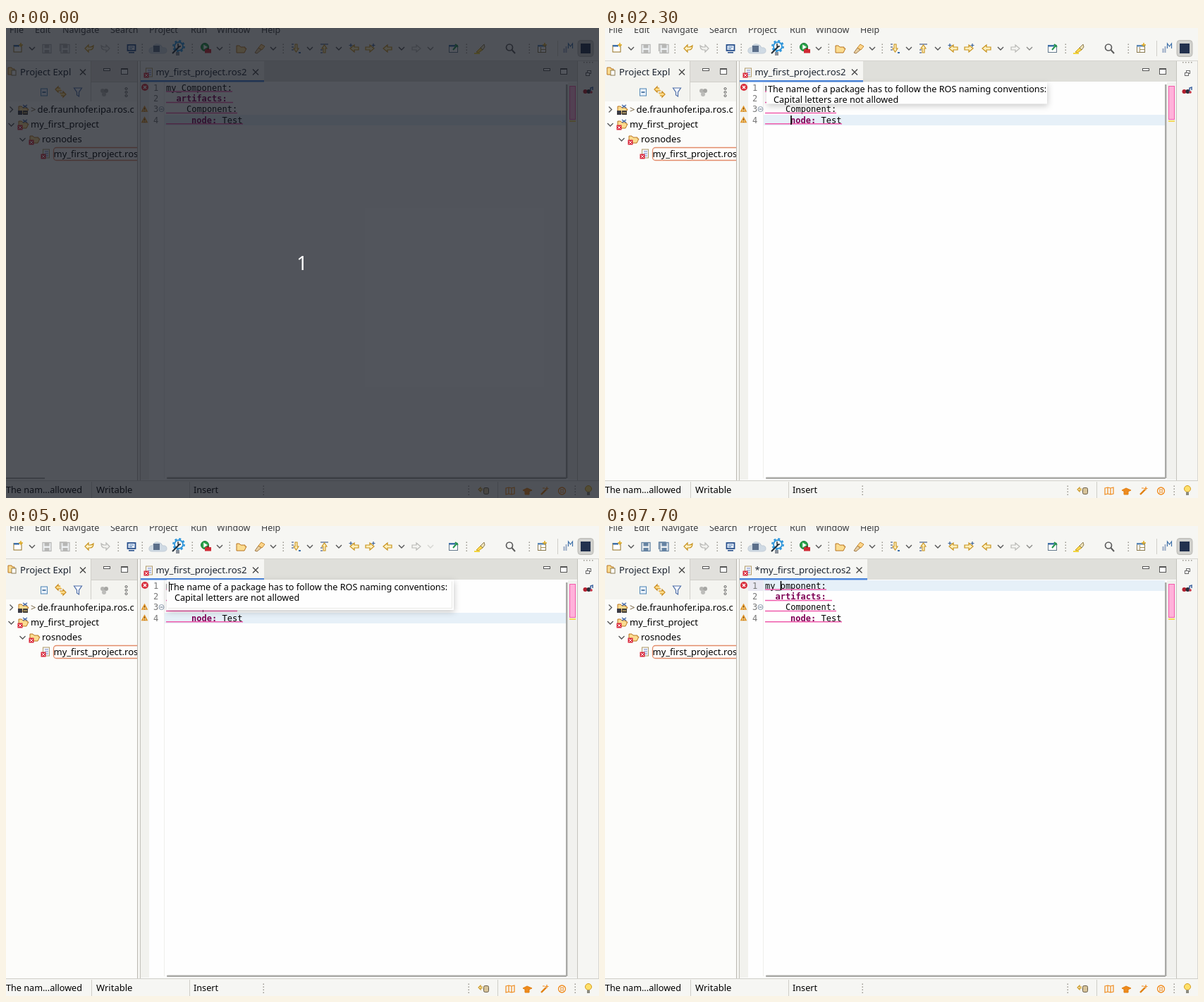
Recreate the animation shown at these times as an HTML page. Size 841 by 666 pixels, loop 8 s.

```html
<!DOCTYPE html>
<html lang="en">
<head>
<meta charset="utf-8">
<title>Editor validation</title>
<style>
html, body { margin: 0; width: 100%; height: 100%; overflow: hidden; background: #fefefe; }
svg { display: block; }
text { font: 13px "Noto Sans", "Open Sans", sans-serif; white-space: pre; }
.code { font: 12px "DejaVu Sans Mono", monospace; }
.key { font-weight: bold; fill: #7f0055; }
.menu { font-size: 12.5px; fill: #3c3c3c; }
.title { font-size: 13.2px; fill: #1c2430; }
.tip, .small { font-size: 12.65px; }
.shadow { filter: drop-shadow(1px 3px 4px #0003); }
.count { font-size: 27px; fill: #fff; text-anchor: middle; }
</style>
</head>
<body>
<svg id="stage" width="841" height="666" viewBox="0 0 841 666"></svg>
<script>
const rect = (x, y, w, h, fill, more = '') =>
  `<rect x="${x}" y="${y}" width="${w}" height="${h}" fill="${fill}" ${more}/>`;
const line = (d, color, width = 1, fill = 'none') =>
  `<path d="${d}" stroke="${color}" stroke-width="${width}" fill="${fill}"/>`;
const dot = (x, y, r, fill, more = '') => `<circle cx="${x}" cy="${y}" r="${r}" fill="${fill}" ${more}/>`;
const text = (x, y, s, cls = '', more = '') => `<text x="${x}" y="${y}" class="${cls}" ${more}>${s}</text>`;
const group = (id, ...parts) => `<g id="${id}">${parts.join('')}</g>`;

const GOLD = '#c8931e', GREY = '#b9b9b6', DARK = '#555', BLUE = '#3d6fa8', ORANGE = '#f08a1c', EDGE = '#c4c3bd';
const chevron = (x, color = DARK, id = '') =>
  `<path id="${id}" d="M${x - 4} 27l4 4 4-4" stroke="${color}" stroke-width="1.4" fill="none"/>`;
const handle = (x, y) => [0, 4, 8, 12].map(i => rect(x - .5, y - 6.5 + i, 1.5, 1.5, '#99968e')).join('');
const close = (x, y) => line(`M${x - 4} ${y - 4}l8 8m0-8l-8 8`, '#444', 1.3);
const minMax = (x, gap) => rect(x - 4.5, 57.5, 9, 3, '#fff', 'stroke="#555"') +
  rect(x + gap - 4.5, 57.5, 9, 8, '#fff', 'stroke="#555"') + rect(x + gap - 4, 57, 9, 2, DARK);
const errorBadge = (x, y) => rect(x - 3.5, y - 3.5, 7, 7, '#d9283c') +
  line(`M${x - 2} ${y - 2}l4 4m0-4l-4 4`, '#fff');
const folder = (x, y) => line(`M${x - 6} ${y + 5}v-10h4l2 2h6v2h2l-3 6z`, '#b87420', 1, '#fbdc90');
const fileIcon = (x, y) => rect(x - 3.5, y - 6, 9, 12, '#f4f6fc', 'stroke="#b09a66"') +
  [-3, 0, 3].map(i => line(`M${x - 1} ${y + i}h5`, '#6f86c8')).join('') + errorBadge(x - 3, y + 4);
const warning = y => line(`M196.5 ${y - 3.5}l3.5 6.5h-7z`, '#e0962c', 1.6, '#ffdf9c') +
  rect(196, y - 2, 1, 3, '#7a4a10') + rect(196, y + 2, 1, 1, '#7a4a10');
const arrow = (x, dir, color, fill) =>
  `<g transform="translate(${x} 29) scale(${dir} 1)">${line('M6-2H0v-3l-6 5 6 5V2h6z', color, 1.2, fill)}</g>`;
const floppy = (x, color) => rect(x - 6, 23.5, 12, 12, '#eef1f3', `stroke="${color}" stroke-width="1.3"`) +
  rect(x - 3.5, 24, 7, 4.5, color) + rect(x - 3.5, 31, 7, 4.5, color);
const saves = color => floppy(58, color) + line('M76.5 33v-10h10', color, 1.3) + floppy(84, color);

const frame = [
  rect(0, 0, 841, 666, '#f6f6f3'),
  rect(0, 46, 841, 1, '#d5d4cf'),
  rect(0, 47, 186, 594, '#fcfcfa'),
  rect(0, 47, 121, 57, '#f4f4f0'), rect(121, 47, 65, 29, '#e1e0dc'), rect(121, 76, 65, 28, '#f4f4f0'),
  rect(120, 47, 1, 57, '#d0cfca'), rect(121, 76, 65, 1, '#d0cfca'),
  rect(186, 47, 1, 594, '#b9b7b0'),
  rect(190, 47, 620, 594, '#fefefe'), rect(190, 47, 620, 29, '#dfdfda'),
  rect(190, 47, 1, 594, '#c4c2bb'), rect(810, 47, 1, 594, EDGE), rect(840, 47, 1, 594, '#d8d7d2'),
  rect(191, 76, 12, 564, '#f2f2ee'), rect(224, 77, 1, 561, '#efefec'),
  rect(797, 77, 13, 563, '#f1f1ee'),
  rect(0, 641, 841, 1, '#cfcec8'),
  [121, 260, 697].map(x => rect(x, 643, 1, 23, '#cfcec8')).join(''),
  [365, 656, 807].map(x => handle(x, 655)).join('')
].join('');

const menus = [[5, 'File'], [41, 'Edit'], [80, 'Navigate'], [148, 'Search'], [203, 'Project'],
  [262, 'Run'], [299, 'Window'], [362, 'Help']].map(([x, s]) => text(x, 6.5, s, 'menu')).join('');

const gear = dot(245, 26, 6, '#f6f6f3', 'stroke="#2a93da" stroke-width="1.8"') +
  dot(245, 26, 7.8, 'none', 'stroke="#2a93da" stroke-width="2.2" stroke-dasharray="3 3.13"') +
  line('M236 36l10-10', '#26323c', 2.2) + line('M244 22v4h4', '#26323c', 1.5);

const toolbar = [
  [99, 159, 193, 264, 317, 393, 653, 742].map(x => handle(x, 29)).join(''),
  [37, 303, 379, 431, 472, 561].map(x => chevron(x)).join(''), chevron(602, '#8c8c89', 'lastChevron'),
  rect(11, 24.5, 11, 9.5, '#fff', 'stroke="#94701f"'), rect(11, 24, 8, 2.5, BLUE),
  line('M21 21v6m-3-3h6', '#e0a91e', 1.5),
  group('savesOff', saves('#b7b7b5')), group('savesOn', saves('#6684a3')),
  line('M117 24l-5 5 5 5v-3h2q5 0 5-6q-2 2-5 2h-2z', GOLD, 1.2, '#fff3c8'),
  line('M142 24l5 5-5 5v-3h-2q-5 0-5-6q2 2 5 2h2z', GREY, 1.2, '#f2f2ef'),
  rect(172.5, 24, 11, 8, '#e8f0fb', 'stroke="#28508c" stroke-width="1.8"'),
  line('M175 27h6m-6 2.5h4', BLUE), rect(174, 34, 8, 1.6, '#28508c'),
  line('M207 36q-5 0-4-5 1-4 5-3 1-6 8-5 5 1 6 5 6-1 6 4 0 4-5 4z', '#c2ccd6', 1, '#cfdae4'),
  rect(209, 25, 9, 9, '#5b6f8a'),
  gear, rect(241, 34, 5, 5, '#8a909a'),
  dot(282, 27, 5.5, '#29a349', 'stroke="#177634"'), line('M280.5 24l5 3-5 3z', '#fff', .5, '#fff'),
  rect(282, 30, 9, 5.5, '#d02a34'), rect(285, 28.5, 3, 2, '#8a1820'),
  folder(333, 30),
  line('M353 35l5-7 4 3-6 5z', '#a07848', 1, '#e8cfa0'), line('M358 28l4-5 5 3-4 5z', '#c58a32', 1, '#ffd588'),
  line('M405 23h3m-3 4h3m-3 4h3', '#6b7ca0', 1.5), line('M410 23v6h-2l3.5 5 3.5-5h-2v-6z', GOLD, 1.1, '#fff0bd'),
  line('M415 35h3', BLUE, 2),
  line('M446 35h3m-3-4h3m-3-8h11', '#6b7ca0', 1.5),
  line('M450 35v-6h-2l3.5-5 3.5 5h-2v6z', GOLD, 1.1, '#fff0bd'),
  arrow(494, 1, GOLD, '#fff0bd'), line('M489 22v5m-2.5-2.5h5', '#3b6298', 1.2),
  arrow(516, -1, GOLD, '#fff0bd'), line('M521 22v5m-2.5-2.5h5', '#3b6298', 1.2),
  arrow(541, 1, GOLD, '#fff0bd'), arrow(582, -1, GREY, '#f4f4f1'),
  rect(628.5, 24.5, 12, 10, '#fff', 'stroke="#64798c"'), rect(628, 24, 9, 2.5, BLUE),
  line('M634 31l6-7m-3-1l4 4', '#269450', 2),
  line('M667 34l6-6 3 3-6 4z', '#c79a20', 1, '#ffd94e'), line('M673 28l5-5 1 4-3 4z', '#8a7a50', 1, '#eee2b8'),
  line('M664 36h8', '#f2d63e', 2),
  dot(714, 27.5, 4.5, 'none', 'stroke="#5c5c5c" stroke-width="1.7"'), line('M717.5 31l4.5 5', '#5c5c5c', 2),
  rect(754.5, 24.5, 11, 10, '#fff', 'stroke="#8a7a50"'), rect(754, 24, 12, 2.5, '#5b88b8'),
  line('M758.5 27v7m0-3.5h7', '#a49058'), line('M764 21v6m-3-3h6', '#e0a91e', 1.5),
  rect(782, 18, 1, 22, '#d0cfca'),
  line('M791.5 35v-6m3 6v-9', '#9aabc6', 2), line('M797.5 29v-7l3 4 3-4v7', BLUE, 1.2),
  rect(811, 17.5, 22, 23, '#d0d0cd', 'rx="4" stroke="#bbbab5"'), rect(815, 22, 14, 14, '#22314e')
].join('');

const explorer = [
  line('M3 56h5l1 2h3v8h-9z', '#b87420', 1, '#fbdc90'), rect(8, 60, 6, 7, '#fff', 'stroke="#8a7a50"'),
  text(20, 67, 'Project Expl', 'title'), close(109, 62.5), minMax(143, 25),
  rect(49.5, 86, 9, 10, '#eaf2fb', 'stroke="#4f85b5"'), line('M51.5 91h5', '#24578c', 1.5),
  line('M77 85h-3v-2l-4 4 4 4v-2h5m-1 7h3v2l4-4-4-4v2h-5', '#c98a1c', 1.2, '#ffdd8a'),
  line('M96.5 85h11l-4 6v6l-3-2v-4z', '#4f6fa8', 1.2, '#f4f7fc'),
  dot(137, 89, 3, '#b5b5b2'), dot(142, 89, 3, '#a6a6a3'), dot(139, 94, 3, '#bcbcb9'),
  [86, 91, 96].map(y => dot(170.5, y, 1.5, 'none', 'stroke="#555"')).join(''),
  '<clipPath id="panel"><rect y="47" width="186" height="594"/></clipPath><g clip-path="url(#panel)">',
  line('M5.5 111.5l4 4-4 4M3.5 135l4 4 4-4M19.5 156l4 4 4-4', DARK, 1.3),
  folder(24, 116), rect(17, 117, 6, 6, '#3a3a44'), line('M24 109l6 4m0-4l-6 4', '#4469a8', 1.5),
  rect(24, 117, 7, 6, '#454038'), line('M25 120h5', '#f0d080'),
  text(35, 120, '&gt;', '', 'fill="#74613e"'), text(44.5, 120, 'de.fraunhofer.ipa.ros.c'),
  folder(24, 137), line('M24 130l6 4m0-4l-6 4', '#4469a8', 1.5), errorBadge(20, 141),
  text(35, 141, 'my_first_project'),
  folder(40, 158), errorBadge(36, 162), text(51, 162, 'rosnodes'),
  fileIcon(56, 178), rect(67.5, 169.5, 140, 18, '#fffdfb', 'rx="4" stroke="#e28b69" stroke-width="1.3"'),
  text(67.5, 183, 'my_first_project.ros2'), '</g>',
  rect(0, 637, 55, 2, '#b3b3b0', 'id="treeScroll"')
].join('');

const rows = [88.5, 104, 119, 134.5];
const editor = [
  rect(225, 123, 569, 15, '#e6f0f8', 'id="rowMark"'),
  rect(203, 77, 21, 15, '#e9e8f2', 'id="numMark"'),
  rect(191, 47, 175, 29, '#f6f6f3', 'id="tab"'), rect(191, 74, 175, 2.5, '#4c86dc', 'id="tabLine"'),
  fileIcon(202, 63), text(212.5, 67, '', 'title', 'id="title"'),
  group('tabClose', close(354, 62.5)), minMax(767, 24),
  rows.map((y, i) => text(209, y, i + 1, 'code', 'fill="#777"')).join(''),
  dot(220.5, 115, 3.5, '#fff', 'stroke="#8a9aac"'), line('M218.5 115h4', '#5a6b80'),
  dot(197, 84, 5, '#d92f3d'), line('M195 82l4 4m0-4l-4 4', '#fff', 1.4), warning(115), warning(130.5),
  text(227, rows[0], '', 'code', 'id="first"'),
  text(241.5, rows[1], 'artifacts:', 'code key'), text(256, rows[2], 'Component:', 'code'),
  text(263.1, rows[3], 'node:', 'code key'), text(306.5, rows[3], 'Test', 'code'),
  '<path id="underline" stroke="#ef5aab" stroke-width="1.4"/>',
  line('M227 105.5h95M227 120.5h101M227 135.8h109', '#ef5aab', 1.4),
  rect(794, 80, 2.5, 558, '#a9a9a6'), rect(228, 636.5, 567, 2.5, '#a9a9a6', 'rx="1"'),
  rect(799.5, 82.5, 8, 47, '#ffb1da', 'stroke="#f45cac"'), rect(799, 131, 9, 2, '#f4d95c')
].join('');

const sidebar = [
  [820, 824, 828, 832].map(x => rect(x - 1, 48, 1.5, 1.5, '#99968e')).join(''),
  rect(824.5, 60.5, 5, 4, '#fff', 'stroke="#666"'), rect(822.5, 63.5, 5, 4, '#fff', 'stroke="#666"'),
  dot(821.5, 90, 3, '#b3202e'), dot(826.5, 90, 3, '#2d2d38'), line('M829 92v-7l3-1v4', '#3b62a0', 1.5),
  dot(830, 91, 1.8, '#c93242')
].join('');

const status = [
  text(0, 659, 'The nam...allowed', 'small'), text(128, 659, 'Writable'), text(266, 659, 'Insert', 'small'),
  line('M676 653h-3v-2l-3 3 3 3v-2h3', GOLD, 1.1, '#fff0bd'),
  rect(677.5, 651.5, 7, 9, '#d7c39a', 'rx="2" stroke="#665c48"'),
  line('M709 652l4-1 4 1 4-1v9l-4 1-4-1-4 1zm4-1v9m4-8v9', ORANGE, 1.2),
  line('M733 655l6-3 7 3-7 3zM736 657v4h6v-4', '#e08012', 1, ORANGE),
  line('M759 661l7-7', '#e08012', 2.4), line('M767 650v5m-2.5-2.5h5M761 652h3', ORANGE, 1.2),
  dot(788.5, 656, 5, 'none', `stroke="${ORANGE}" stroke-width="1.3"`),
  dot(788.5, 656, 2, 'none', `stroke="${ORANGE}"`),
  line('M785 652l2 2m5-2l-2 2m-5 6l2-2m5 2l-2-2', ORANGE),
  dot(826, 653, 4.5, '#ffe06a', 'stroke="#d39c20"'), rect(824, 657.5, 4, 4.5, '#8a8a80')
].join('');

const tipText = text(231, 90.5, 'The name of a package has to follow the ROS naming conventions:', 'tip') +
  text(239, 105.5, 'Capital letters are not allowed', 'tip');
const tips = group('smallTip', rect(229, 77, 398, 30.5, '#fefefe', 'class="shadow"'), tipText) +
  group('bigTip', rect(228, 76, 407, 43, '#fefefe', 'class="shadow"'),
    line('M230 116.5h402.5v-38', '#e9e9e6'), tipText, rect(231, 79, 1, 14, '#000'));

const countdown = group('countdown', rect(0, 0, 841, 666, 'rgba(18,22,32,.73)'), text(420, 343, '1', 'count'));

document.getElementById('stage').innerHTML = frame + menus + toolbar + explorer + editor + sidebar +
  status + rect(0, 0, 1.6, 13, '#000', 'id="caret"') + tips + countdown;

const el = id => document.getElementById(id);
const show = (id, on) => el(id).style.display = on ? '' : 'none';
const set = (id, attrs) => Object.entries(attrs).forEach(([k, v]) => el(id).setAttribute(k, v));
const caretOn = [[300, 900], [1400, 2000], [2300, 2900], [3500, 4100], [5300, 5900], [6600, 7200], [7700, 8000]];

function draw(t) {
  const within = (a, b) => t >= a && t < b;
  const edited = t >= 7700, onFirst = t >= 6600;
  show('countdown', t < 100);
  show('smallTip', within(2300, 5000));
  show('bigTip', within(5000, 5200));
  show('savesOn', edited);
  show('savesOff', !edited);
  show('numMark', onFirst);
  show('caret', caretOn.some(([a, b]) => within(a, b)));
  set('caret', { x: edited ? 248.7 : onFirst ? 255.7 : 263.2, y: onFirst ? 78 : 124 });
  set('rowMark', { y: onFirst ? 77 : 123 });
  set('treeScroll', { opacity: Math.min(1, Math.max(0, (2000 - t) / 500)) });
  set('lastChevron', { opacity: within(4400, 5200) ? .3 : 1 });
  set('tab', { width: edited ? 181 : 175 });
  set('tabLine', { width: edited ? 181 : 175 });
  set('tabClose', { transform: `translate(${edited ? 6.5 : 0} 0)` });
  set('underline', { d: `M227 90h${edited ? 87 : 94}` });
  el('title').textContent = (edited ? '*' : '') + 'my_first_project.ros2';
  el('first').textContent = edited ? 'my_omponent:' : 'my_Component:';
}

const start = performance.now();
function tick() {
  draw((performance.now() - start) % 8000);
  requestAnimationFrame(tick);
}
tick();
</script>
</body>
</html>
```
